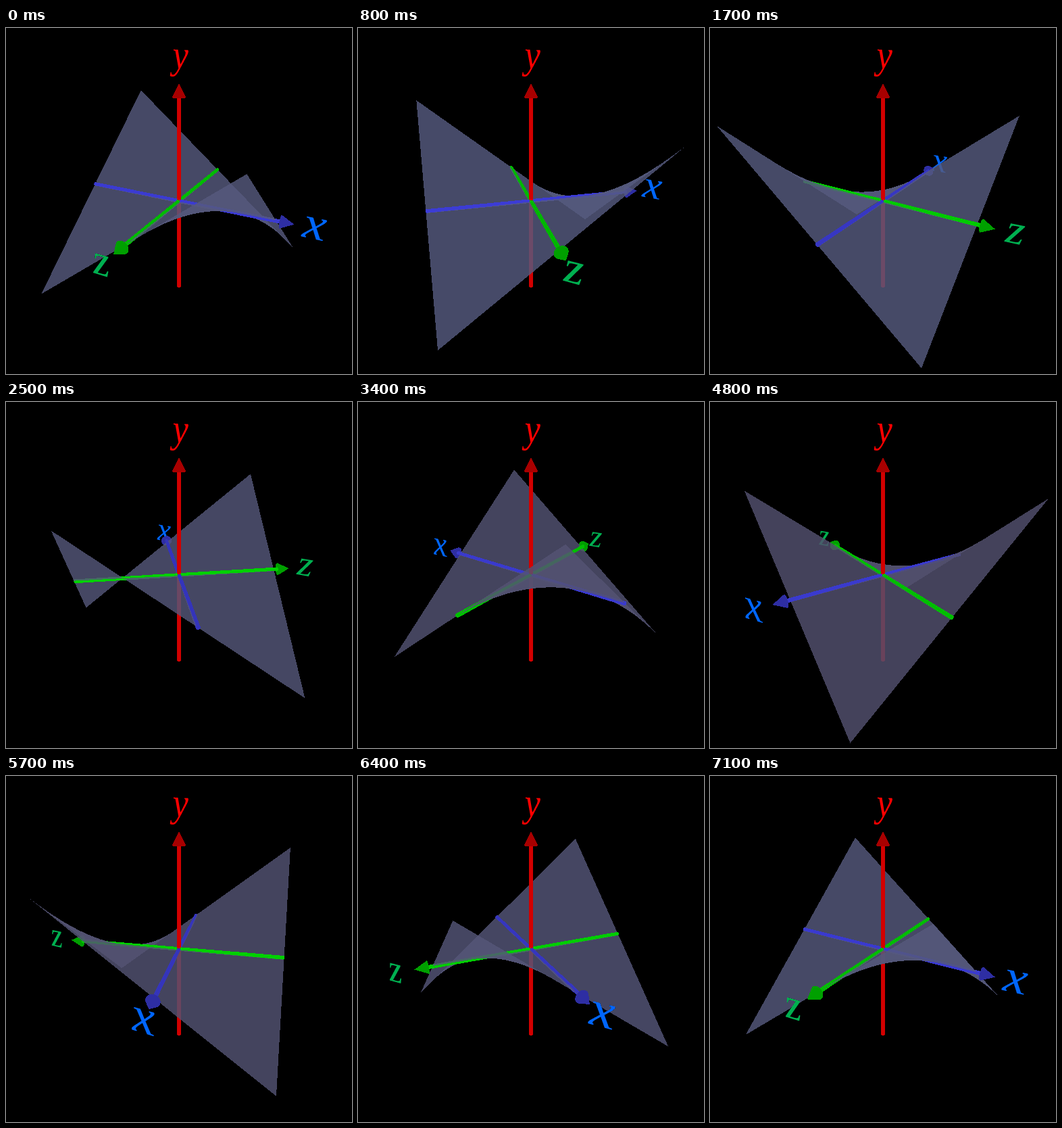
A matplotlib script for the animation above (7.2 s loop, 512 px wide and 512 px high).

```python
import numpy as np
import matplotlib.pyplot as plt
from matplotlib.animation import FuncAnimation
from matplotlib.path import Path
from matplotlib.textpath import TextPath

SIZE, FRAMES, INTERVAL = 512, 72, 100

# Camera in the direction (1, 1, 2), looking at the middle of the saddle
DIST, FOCAL = 4.25, 646.0
SIN_E, COS_E = 1 / np.sqrt(6), np.sqrt(5 / 6)
YAW = np.arctan2(1, 2)
UP = np.array([0, COS_E, -SIN_E])
BACK = np.array([0, SIN_E, COS_E])

# Saddle y = HEIGHT * x * z
HEIGHT, LOW, HIGH = 0.828, -1.0, 0.96
ALPHA = 0.82
COOL = np.array([71, 75, 105.0])
WARM = np.array([68, 66, 91.0])
LIGHT = np.radians(20)

# Arrows
SHAFT_R, HEAD_R, TIP = 0.0185, 0.06, 1.12
SHAFT_RGB = np.array([(58, 58, 205), (200, 0, 0), (0, 200, 0)])
HEAD_RGB = [(46, 46, 163), (168, 0, 0), (0, 160, 0)]

# Letters
LABEL_AT, SUB = 1.285, 3
LABEL_EM = [0.435, 0.332, 0.39]
LABEL_RGB = [(0, 102, 255), (255, 0, 0), (0, 176, 80)]


def glyph(letter, em):
    path = TextPath((0, 0), letter, size=1,
                    prop={"family": "Liberation Serif", "style": "italic"})
    box = path.get_extents()
    mid = [(box.x0 + box.x1) / 2, (box.y0 + box.y1) / 2]
    return Path((path.vertices - mid) * em, path.codes)


GLYPHS = [glyph(c, em) for c, em in zip("xyz", LABEL_EM)]

steps = np.arange(SIZE) + 0.5 - SIZE / 2
PX, PY = np.meshgrid(steps / FOCAL, -steps / FOCAL)
RAYS = np.stack([PX, PY * COS_E - SIN_E, -PY * SIN_E - COS_E])


def project(points):
    """Screen position and depth of points given in view space."""
    depth = DIST - points @ BACK
    x = SIZE / 2 + FOCAL * points[..., 0] / depth
    y = SIZE / 2 - FOCAL * (points @ UP) / depth
    return np.stack([x, y], axis=-1), depth


def window(screen, pad):
    """Pixel slices around some screen points."""
    lo = np.clip(np.floor(screen.min(axis=0)) - pad, 0, SIZE).astype(int)
    hi = np.clip(np.ceil(screen.max(axis=0)) + pad, 0, SIZE).astype(int)
    return slice(lo[1], hi[1]), slice(lo[0], hi[0])


def spin(v, angle):
    """View space to the space of the turning saddle."""
    c, s = np.cos(angle), np.sin(angle)
    return np.stack([v[0] * c + v[2] * s, v[1], v[2] * c - v[0] * s])


def cone_hit(eye, ray, k, r0, slope, lo, hi):
    """Nearest hit on a round side of radius r0 + slope * s along axis k."""
    i, j = (k + 1) % 3, (k + 2) % 3
    s, ds = eye[k], ray[k]
    w = r0 + slope * s
    a = ray[i] ** 2 + ray[j] ** 2 - (slope * ds) ** 2
    b = eye[i] * ray[i] + eye[j] * ray[j] - slope * w * ds
    c = eye[i] ** 2 + eye[j] ** 2 - w ** 2
    root = np.sqrt(b * b - a * c)
    best = np.full(ds.shape, np.inf)
    for t in ((-b - root) / a, (-b + root) / a):
        pos = s + t * ds
        ok = (pos >= lo) & (pos <= hi) & (t > 0) & (t < best)
        best = np.where(ok, t, best)
    return best


def disc_hit(eye, ray, k, at, radius):
    i, j = (k + 1) % 3, (k + 2) % 3
    t = (at - eye[k]) / ray[k]
    inside = (eye[i] + t * ray[i]) ** 2 + (eye[j] + t * ray[j]) ** 2
    return np.where(inside <= radius ** 2, t, np.inf)


def saddle_hits(eye, ray):
    """Far and near depth of the saddle for every ray, NaN where missed."""
    a = HEIGHT * ray[0] * ray[2]
    b = HEIGHT * (eye[0] * ray[2] + eye[2] * ray[0]) - ray[1]
    c = HEIGHT * eye[0] * eye[2] - eye[1]
    q = -0.5 * (b + np.copysign(np.sqrt(b * b - 4 * a * c), b))
    hits = []
    for t in (q / a, c / q):
        x, z = eye[0] + t * ray[0], eye[2] + t * ray[2]
        ok = (x >= LOW) & (x <= HIGH) & (z >= LOW) & (z <= HIGH) & (t > 0)
        hits.append(np.where(ok, t, np.nan))
    return hits


def draw_arrow(image, depth, eye, ray, k, axis):
    ends, _ = project(np.outer([-1, TIP], axis))
    win = window(ends, 16)
    part = ray[(slice(None),) + win]
    slope = HEAD_R / (TIP - 1)
    shaft = np.minimum(cone_hit(eye, part, k, SHAFT_R, 0, -1, 1),
                       disc_hit(eye, part, k, -1, SHAFT_R))
    head = np.minimum(cone_hit(eye, part, k, slope * TIP, -slope, 1, TIP),
                      disc_hit(eye, part, k, 1, HEAD_R))
    # A shaft is brighter when it lies across the view
    shade = 1.05 - 0.14 * axis[2] ** 2
    for hit, rgb in ((shaft, SHAFT_RGB[k] * shade), (head, HEAD_RGB[k])):
        front = hit < depth[win]
        image[win][front] = rgb
        depth[win][front] = hit[front]


def draw_label(image, depth, k, axis):
    shape = GLYPHS[k]
    right = np.array([np.cos(YAW), 0, np.sin(YAW)])
    gx, gy = shape.vertices[:, :1], shape.vertices[:, 1:]
    points = LABEL_AT * axis + gx * right + gy * np.array([0, 1, 0])
    outline = Path(project(points)[0], shape.codes)
    far = project(LABEL_AT * axis)[1]
    win = window(outline.get_extents().get_points(), 1)
    rows, cols = win
    h, w = rows.stop - rows.start, cols.stop - cols.start
    ys = rows.start + (np.arange(h * SUB) + 0.5) / SUB
    xs = cols.start + (np.arange(w * SUB) + 0.5) / SUB
    grid = np.stack(np.meshgrid(xs, ys), axis=-1).reshape(-1, 2)
    cover = outline.contains_points(grid).reshape(h, SUB, w, SUB)
    cover = cover.mean(axis=(1, 3)) * (far < depth[win])
    mix = cover[..., None]
    image[win] = image[win] * (1 - mix) + mix * np.array(LABEL_RGB[k])
    depth[win][cover > 0.5] = far


def render(n):
    turn = YAW - 2 * np.pi * n / FRAMES
    c, s = np.cos(turn), np.sin(turn)
    axes = np.array([[c, 0, s], [0, 1, 0], [-s, 0, c]])
    eye, ray = spin(DIST * BACK, turn), spin(RAYS, turn)
    image = np.zeros((SIZE, SIZE, 3))
    depth = np.full((SIZE, SIZE), np.inf)
    glow = 0.5 + 0.5 * np.cos(turn + LIGHT)
    sheet = WARM + (COOL - WARM) * glow

    with np.errstate(all="ignore"):
        for k in range(3):
            draw_arrow(image, depth, eye, ray, k, axes[k])
        for k in range(3):
            draw_label(image, depth, k, axes[k])
        # Every sheet tints alike, so the order of the two hits is free
        for hit in saddle_hits(eye, ray):
            front = hit < depth
            image[front] = image[front] * (1 - ALPHA) + sheet
    return np.clip(image, 0, 255).astype(np.uint8)


fig = plt.figure(figsize=(SIZE / 100, SIZE / 100), dpi=100, facecolor="black")
ax = fig.add_axes([0, 0, 1, 1])
ax.set_axis_off()
picture = ax.imshow(render(0), interpolation="nearest", aspect="auto")


def update(n):
    picture.set_data(render(n))
    return [picture]


anim = FuncAnimation(fig, update, frames=FRAMES, interval=INTERVAL,
                     repeat=True, repeat_delay=0)
plt.show()
```
